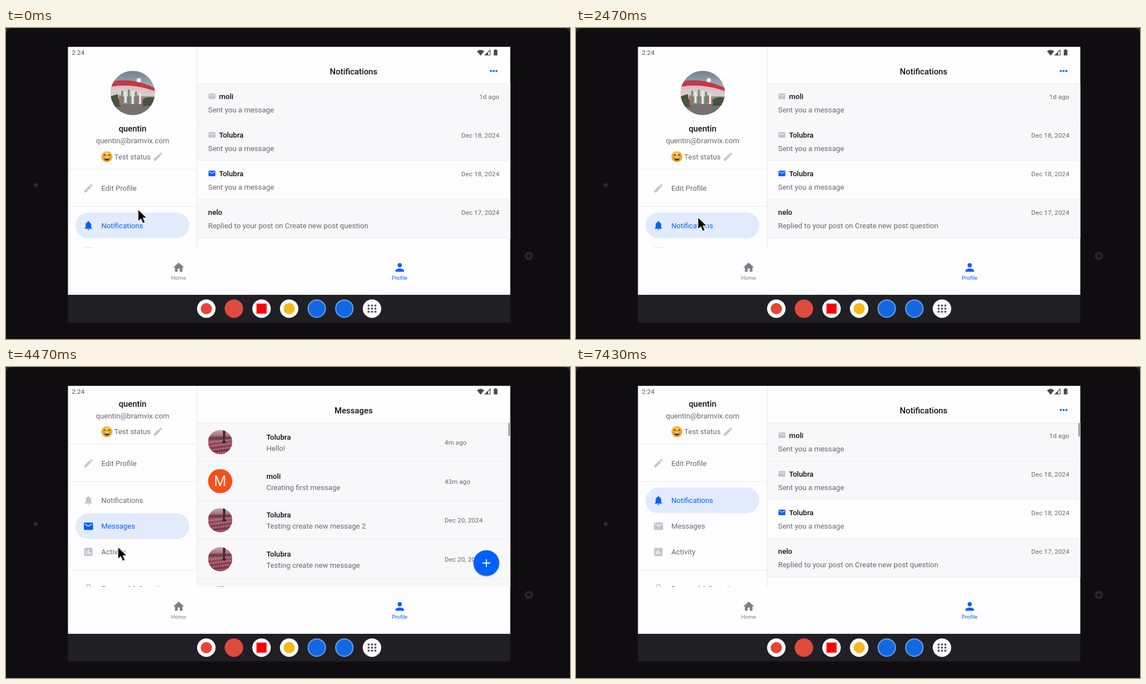
Recreate the animation shown at these times as an HTML page. Size 1006 px wide and 556 px high, loop 7.46 s.

```html
<!DOCTYPE html>
<html lang="en">
<head>
<meta charset="utf-8">
<title>Tablet profile screen</title>
<style>
  html, body { margin: 0; width: 100%; height: 100%; overflow: hidden; background: #100d10; }
  svg { display: block; width: 1006px; height: 556px; }
  text { font-family: Roboto, sans-serif; white-space: pre; }
  .item { --tint: #c5c4c9; --label: #69686d; }
  .item.active { --tint: #0560fd; --label: #0560fd; }
  .item .pill { display: none; }
  .item.active .pill { display: inline; }
</style>
</head>
<body>
<svg id="stage" viewBox="0 0 1006 556" xmlns="http://www.w3.org/2000/svg"></svg>
<script>
const LOOP = 7460;
const BLUE = '#0560fd', INK = '#111114', GREY = '#69686d', PALE = '#c5c4c9', BAR = '#9b9a9e';
const WHITE = '#fefdff', SOFT = '#f8f7fa', LINE = '#ebeaee';

const ICONS = {
  mail: 'M20 4H4c-1.1 0-2 .9-2 2v12c0 1.1.9 2 2 2h16c1.1 0 2-.9 2-2V6c0-1.1-.9-2-2-2zm0 4l-8 5-8-5V6l8 5 8-5v2z',
  bell: 'M12 22c1.1 0 2-.9 2-2h-4c0 1.1.89 2 2 2zm6-6v-5c0-3.07-1.64-5.64-4.5-6.32V4c0-.83-.67-1.5-1.5-1.5s-1.5.67-1.5 1.5v.68C7.63 5.36 6 7.92 6 11v5l-2 2v1h16v-1l-2-2z',
  edit: 'M3 17.25V21h3.75L17.81 9.94l-3.75-3.75L3 17.25zM20.71 7.04c.39-.39.39-1.02 0-1.41l-2.34-2.34c-.39-.39-1.02-.39-1.41 0l-1.83 1.83 3.75 3.75 1.83-1.83z',
  chart: 'M19 3H5c-1.1 0-2 .9-2 2v14c0 1.1.9 2 2 2h14c1.1 0 2-.9 2-2V5c0-1.1-.9-2-2-2zM9 17H7v-7h2v7zm4 0h-2V7h2v10zm4 0h-2v-4h2v4z',
  lock: 'M18 8h-1V6c0-2.76-2.24-5-5-5S7 3.24 7 6v2H6c-1.1 0-2 .9-2 2v10c0 1.1.9 2 2 2h12c1.1 0 2-.9 2-2V10c0-1.1-.9-2-2-2zM8.9 6c0-1.71 1.39-3.1 3.1-3.1s3.1 1.39 3.1 3.1v2H8.9V6z',
  home: 'M10 20v-6h4v6h5v-8h3L12 3 2 12h3v8z',
  person: 'M12 12c2.21 0 4-1.79 4-4s-1.79-4-4-4-4 1.79-4 4 1.79 4 4 4zm0 2c-2.67 0-8 1.34-8 4v2h16v-2c0-2.66-5.33-4-8-4z'
};

const rect = (x, y, w, h, fill, extra = '') => `<rect x="${x}" y="${y}" width="${w}" height="${h}" fill="${fill}" ${extra}/>`;
const circle = (x, y, r, fill, extra = '') => `<circle cx="${x}" cy="${y}" r="${r}" fill="${fill}" ${extra}/>`;
// y is the middle of the capital letters
const text = (str, x, y, { size = 13.13, fill = GREY, weight = 400, anchor = 'start', spacing = 0 } = {}) =>
  `<text x="${x}" y="${y + size * .355}" font-size="${size}" font-weight="${weight}" text-anchor="${anchor}" letter-spacing="${spacing}" style="fill:${fill}">${str}</text>`;
const icon = (name, x, y, size, fill) =>
  `<path d="${ICONS[name]}" transform="translate(${x - size / 2} ${y - size / 2}) scale(${size / 24})" style="fill:${fill}"/>`;
const photo = (name, x, y, r) => `<use href="#${name}" transform="translate(${x} ${y}) scale(${r / 40})"/>`;
const bold = { fill: INK, weight: 500 };
const heading = { ...bold, size: 14.77 };
const small = { size: 11.5, spacing: .13 };
const pageTitle = str => text(str, 620, 77.5, { ...heading, anchor: 'middle' });
const pageBack = rect(341, 100, 559, 293, SOFT);

const defs = `<defs>
  <clipPath id="round"><circle r="40"/></clipPath>
  <clipPath id="sideClip"><rect x="111" y="53" width="230" height="340"/></clipPath>
  <clipPath id="pageClip"><rect x="341" y="34" width="558.5" height="359"/></clipPath>
  <linearGradient id="sky" x2="0" y2="1"><stop stop-color="#71808f"/><stop offset=".5" stop-color="#b4bec9"/></linearGradient>
  <linearGradient id="field" x2="0" y2="1"><stop stop-color="#c9a9ae"/><stop offset=".3" stop-color="#a85c6c"/><stop offset="1" stop-color="#6f3040"/></linearGradient>
  <radialGradient id="smile" cy=".35"><stop stop-color="#ffd84a"/><stop offset="1" stop-color="#f5a623"/></radialGradient>
  <filter id="shadow" x="-10%" y="-10%" width="120%" height="125%"><feDropShadow dx="0" dy="1" stdDeviation="1" flood-opacity=".32"/></filter>
  <g id="building" clip-path="url(#round)">
    <rect x="-40" y="-40" width="80" height="80" fill="url(#sky)"/>
    <circle cx="11" cy="-23" r="4" fill="#eef2f5"/>
    <path d="M-40-16Q0-20 40-6V24H-40z" fill="#d3cecd"/>
    <path d="M-40-20Q-5-30 40-9V-3Q0-18-40-11z" fill="#c03a49"/>
    <path d="M-40-11Q0-18 40-3V2Q0-11-40-6z" fill="#e6bcc0"/>
    <path d="M-22 6H40V20H-22z" fill="#8f8a8b"/>
    <path d="M-40 20H40V40H-40z" fill="#77706e"/>
    <path d="M-40 6L-27 2-22 25H-40zM18 12Q27 5 40 9V23H18z" fill="#45533f"/>
    <path d="M-19-4V22M-7-6V22M6-2V20" stroke="#65856a" stroke-width="3"/>
    <path d="M-13-2V18M0-4V20M13 0V20" stroke="#e9e5e2" stroke-width="4"/>
    <path d="M-23 4V22M10 4V18" stroke="#c64c50" stroke-width="2.5"/>
  </g>
  <g id="garden" clip-path="url(#round)">
    <rect x="-40" y="-40" width="80" height="80" fill="url(#field)"/>
    <path d="M-40-18H40V-8H-40z" fill="#68444b"/>
    <path d="M-40 2L40-9M-40 15L40 4M-40 28L40 17M-25 38L40 31" stroke="#c97f8d" stroke-width="4" stroke-dasharray="5 3"/>
    <path d="M9-40H18L15-8 20 4H6L10-8z" fill="#38272d"/>
  </g>
</defs>`;

function sideItem(id, iconName, label, y) {
  return `<g class="item" id="item-${id}">
    ${rect(124, y - 23, 203, 46, '#e1ebfc', 'rx="23" class="pill"')}
    ${icon(iconName, 147, y, 19.7, 'var(--tint)')}${text(label, 170, y, { fill: 'var(--label)' })}</g>`;
}

const emoji = `<g transform="translate(180 230)">${circle(0, 0, 9.8, 'url(#smile)')}
  <path d="M-5.5-2Q-4-5.5-2-2M2-2Q4-5.5 5.500-2" fill="none" stroke="#59351c" stroke-width="1.4" stroke-linecap="round"/>
  <path d="M-5.5 1H5.5Q5 7 0 7T-5.5 1z" fill="#66351f"/><path d="M-4.7 1.400H4.700L4.300 3.200H-4.300z" fill="#fff"/></g>`;

const sidebar = `<g clip-path="url(#sideClip)"><g id="side">
  ${photo('building', 226, 116.2, 39.6)}
  ${text('quentin', 225.7, 180, { ...heading, anchor: 'middle' })}
  ${text('quentin@bramvix.com', 225.7, 201.5, { anchor: 'middle' })}
  ${emoji}${text('Test status', 193, 230)}${icon('edit', 271, 230, 19.7, PALE)}
  ${[252.5, 319, 477.5].map(y => rect(111, y - .5, 230, 1, LINE)).join('')}
  ${sideItem('edit', 'edit', 'Edit Profile', 286.5)}
  ${sideItem('notifications', 'bell', 'Notifications', 353)}
  ${sideItem('messages', 'mail', 'Messages', 399)}
  ${sideItem('activity', 'chart', 'Activity', 445)}
  ${sideItem('security', 'lock', 'Personal &amp; Security', 511)}
  </g>${rect(337, 53, 3, 178, BAR, 'id="sideBar"')}</g>`;

function notification(i, name, detail, date, mailColor) {
  const y = 99.5 + i * 69;
  return rect(341, y, 559, 69, mailColor === BLUE ? WHITE : SOFT) + rect(341, y + 68, 559, 1, LINE) +
    (mailColor ? icon('mail', 367.3, y + 22.5, 14.77, mailColor) : '') +
    text(name, mailColor ? 380 : 360.6, y + 23, bold) + text(detail, 360.6, y + 47) +
    text(date, 880, y + 23, { ...small, anchor: 'end' });
}

function message(i, name, detail, date) {
  const y = 134.2 + i * 69.8;
  const face = name === 'moli'
    ? circle(382, y, 21.6, '#f1511b') + text('M', 382, y, { size: 25, fill: '#fbe9e2', anchor: 'middle' })
    : photo('garden', 382, y, 21.6);
  return face + text(name, 464.4, y - 9, bold) + text(detail, 464.4, y + 11) +
    text(date, 782.3, y + .6, small) + rect(341, y + 34.2, 559, 1, LINE);
}

function post(y, title, age, body) {
  return rect(390, y, 460.5, 182.5, WHITE, 'rx="5" filter="url(#shadow)"') +
    text(title, 410, y + 31, heading) + photo('building', 426.3, y + 69.7, 16.5) +
    text('Quentin', 449, y + 63, { fill: '#2b2b2f' }) + text(age, 449, y + 81, small) +
    rect(410.5, y + 102, 87, 23.5, WHITE, `stroke="${LINE}"`) + circle(420.3, y + 114, 2.5, INK) +
    text('Blunvek UAT', 427, y + 114.3, { size: 11.5 }) + text(body, 410, y + 148.5, { fill: '#2b2b2f' });
}

const pages = {
  notifications: pageTitle('Notifications') +
    [864.8, 869.8, 874.8].map(x => circle(x, 76.8, 1.9, BLUE)).join('') +
    notification(0, 'moli', 'Sent you a message', '1d ago', PALE) +
    notification(1, 'Tolubra', 'Sent you a message', 'Dec 18, 2024', PALE) +
    notification(2, 'Tolubra', 'Sent you a message', 'Dec 18, 2024', BLUE) +
    notification(3, 'nelo', 'Replied to your post on Create new post question', 'Dec 17, 2024'),
  messages: pageTitle('Messages') + pageBack +
    message(0, 'Tolubra', 'Hello!', '4m ago') +
    message(1, 'moli', 'Creating first message', '43m ago') +
    message(2, 'Tolubra', 'Testing create new message 2', 'Dec 20, 2024') +
    message(3, 'Tolubra', 'Testing create new message', 'Dec 20, 2024') +
    message(4, 'Tolubra', 'Testing message', 'Dec 20, 2024') +
    circle(856.8, 350.5, 23, BLUE, 'filter="url(#shadow)"') +
    '<path d="M849.8 350.5h14M856.8 343.5v14" stroke="#fff" stroke-width="1.8"/>',
  activity: pageTitle('Activity') + pageBack +
    post(109.5, 'New post tablet android landscape', '1m ago', 'Hey this is post from android') +
    post(302, 'Creating new post tablet android', '6m ago', 'Hey this is post from android')
};
const barHeight = { notifications: 24, messages: 23, activity: 39 };

const statusBar = text('2:24', 117.3, 44.3, { size: 11.8, fill: '#58575c' }) +
  `<g fill="#4b4a4f"><path d="M840 41.5Q846.5 36.5 853 41.5L846.5 49.5z"/>
  <path d="M854.5 48.5L863.5 39.5V48.5z" fill="none" stroke="#4b4a4f" stroke-width="1.2"/><path d="M854 49l6-6v6z"/>
  <path d="M872 38h2.5v1.2h2V49H870v-9.8h2z"/></g>`;

const tabLabel = { size: 9.85, anchor: 'middle' };
const tabs = icon('home', 308, 428, 23, '#7f7e83') + text('Home', 307.7, 447, { ...tabLabel, fill: '#7f7e83' }) +
  icon('person', 702.3, 428, 23, BLUE) + text('Profile', 702, 447, { ...tabLabel, fill: BLUE });

const dockX = i => 357.3 + i * 49.25, dockY = 501.7;
const dock = rect(110.5, 477, 789, 49.5, '#202024') +
  [0, 2, 3, 6].map(i => circle(dockX(i), dockY, 16.5, WHITE)).join('') +
  circle(dockX(0), dockY, 10, '#ea4335') +
  circle(dockX(1), dockY, 16.5, '#de4b3c') +
  rect(dockX(2) - 9, dockY - 9, 18, 18, '#f00') +
  circle(dockX(3), dockY, 10, '#f6b81c') +
  [4, 5].map(i => circle(dockX(i), dockY, 15.5, '#1267e3', 'stroke="#6c9fdd" stroke-width="2"')).join('') +
  Array.from({ length: 9 }, (_, i) =>
    circle(dockX(6) + (i % 3 - 1) * 6, dockY + (Math.floor(i / 3) - 1) * 5.5, 1.9, '#51556b')).join('');

const device = rect(0, 0, 1006, 556, '#29282c') + rect(0, 0, 1006, 570, '#100d10', 'rx="12"') +
  circle(53, 280.5, 4.5, '#1d1c20') + circle(53, 280.5, 2, '#39383c') +
  circle(932.7, 407.5, 7.5, '#252428') + circle(932.7, 407.5, 4.5, '#141317', 'stroke="#39383c"') +
  rect(110.5, 33.7, 789, 443.3, WHITE);

const pageArea = '<g clip-path="url(#pageClip)">' +
  Object.entries(pages).map(([id, body]) => `<g id="page-${id}">${body}</g>`).join('') +
  rect(341, 99.7, 559, 1, LINE) + rect(896, 100, 3, 24, BAR, 'id="pageBar"') + '</g>' +
  rect(340.5, 34, 1, 359, '#e6e5e9');

const cursor = '<path id="cursor" d="M0 0V22L5 17.4 8.6 25.4 12.7 23.6 9.2 15.8H16z" stroke="#fff" stroke-width="1.2" stroke-linejoin="round"/>';

document.getElementById('stage').innerHTML = defs + device + statusBar + sidebar + pageArea + tabs + dock + cursor;

// time, x, y of the pointer tip
const path = [
  [0, 235.5, 324], [1100, 224.5, 328], [2470, 217.5, 338], [3085, 211.9, 209], [3300, 211.5, 209],
  [3850, 204, 282], [4100, 203, 284], [4600, 199, 329], [5150, 201, 329],
  [5950, 221, 242], [6350, 221, 240], [6750, 235, -30], [LOOP, 235, -30]
];
const DRAG_START = 2470, DRAG_END = 3085, SCROLL_END = 114.4;
const visits = [[0, 'notifications'], [4000, 'messages'], [4950, 'activity'], [6280, 'notifications']];

const clamp = v => Math.max(0, Math.min(1, v));
const ease = u => u * u * (3 - 2 * u);
const fadeAfter = (t, end) => 1 - clamp((t - end) / 250);
const get = id => document.getElementById(id);

function pointer(t) {
  const i = path.findIndex((p, k) => k && t <= p[0]);
  const [t0, x0, y0] = path[i - 1], [t1, x1, y1] = path[i];
  const u = ease((t - t0) / (t1 - t0));
  return [x0 + (x1 - x0) * u, y0 + (y1 - y0) * u];
}

function draw(t) {
  const [x, y] = pointer(t);
  get('cursor').setAttribute('transform', `translate(${x} ${y})`);

  // the list follows the drag once the touch slop is passed
  const scroll = t < DRAG_START ? 0 : t < DRAG_END ? Math.max(0, 323.4 - y) : SCROLL_END;
  get('side').setAttribute('transform', `translate(0 ${-scroll})`);
  get('sideBar').setAttribute('y', 53 + scroll * .524);
  get('sideBar').setAttribute('opacity', scroll ? fadeAfter(t, DRAG_END + 300) : 0);

  const [since, current] = visits.filter(v => v[0] <= t).pop();
  for (const id in pages) {
    get('page-' + id).setAttribute('display', id === current ? 'inline' : 'none');
    get('item-' + id).classList.toggle('active', id === current);
  }
  get('pageBar').setAttribute('height', barHeight[current]);
  get('pageBar').setAttribute('opacity', since ? fadeAfter(t, since + 1200) : 0);
}

function tick() {
  draw(performance.now() % LOOP);
  requestAnimationFrame(tick);
}
tick();
</script>
</body>
</html>
```
